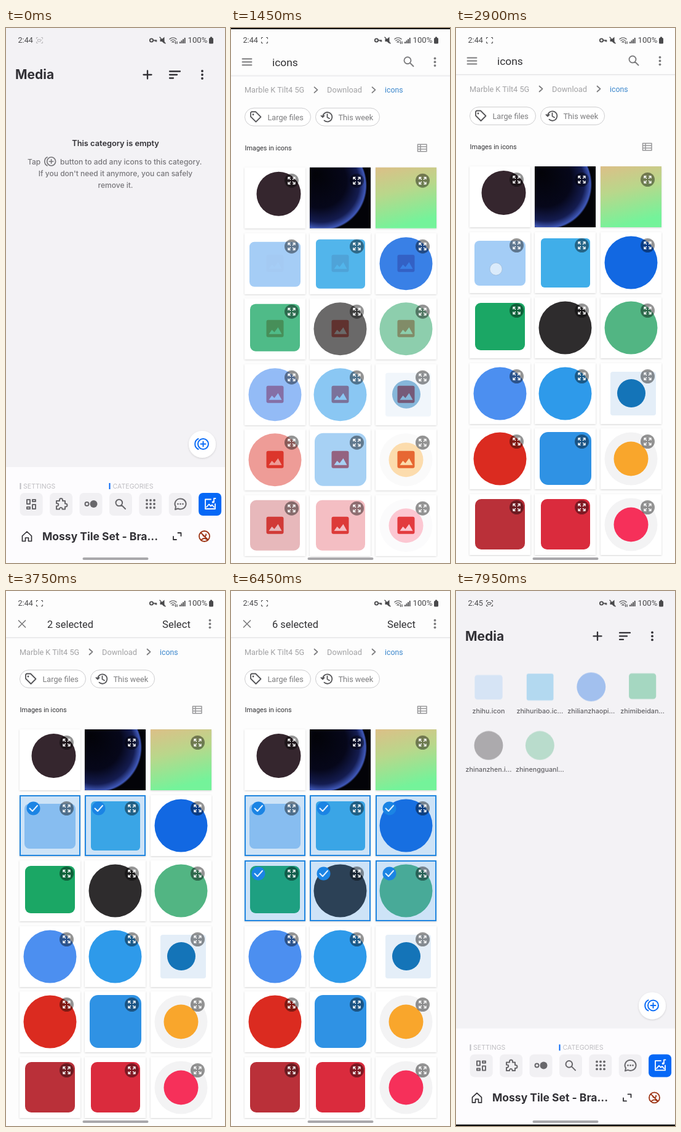
Write an HTML page that moves like this. It is 356 px wide and 870 px high and loops after 8 s.

```html
<!DOCTYPE html>
<html lang="en">
<head>
<meta charset="utf-8">
<title>Adding icons to a category</title>
<style>
html, body { margin: 0; width: 100%; height: 100%; overflow: hidden; background: #000; }
svg { display: block; width: 100vw; height: 100vh; }
.home text { font-family: Inter, sans-serif; }
.picker text, .status text { font-family: Roboto, sans-serif; }
.line { fill: none; stroke-linecap: round; stroke-linejoin: round; }
</style>
</head>
<body>
<svg id="stage" viewBox="0 0 356 870" xmlns="http://www.w3.org/2000/svg"></svg>
<script>
const LOOP = 8000;
const OPEN = 1000, CLOSE = 7600, SLIDE = 620;
const PICKS = [3100, 3500, 4000, 4500, 4900, 5350];
const FIRST_PICK = 3; // tile index of the first selected file

const text = (x, y, s, size, fill, more = '') =>
  `<text x="${x}" y="${y}" font-size="${size}" fill="${fill}" ${more}>${s}</text>`;
const rect = (x, y, w, h, fill, r = 0, more = '') =>
  `<rect x="${x}" y="${y}" width="${w}" height="${h}" rx="${r}" fill="${fill}" ${more}/>`;
const disc = (x, y, r, fill, more = '') => `<circle cx="${x}" cy="${y}" r="${r}" fill="${fill}" ${more}/>`;
const line = (d, stroke, w = 2, more = '') =>
  `<path class="line" d="${d}" stroke="${stroke}" stroke-width="${w}" ${more}/>`;
const group = (id, body, more = '') => `<g id="${id}" ${more}>${body}</g>`;
const dots = (x, y, gap, fill) => [-1, 0, 1].map(k => disc(x, y + k * gap, 1.9, fill)).join('');

const round = fill => disc(49.5, 49.5, 43, fill);
const plate = fill => round('#f3f3f4') + disc(49.5, 49.5, 28, fill);
const ARTS = [
  disc(55.5, 43, 36, '#35262e'),
  rect(0, 0, 99, 99, 'url(#night)'),
  rect(0, 0, 99, 99, 'url(#dawn)'),
  rect(8, 14, 83, 73, '#a4cdf6', 8),
  rect(10, 10, 80, 80, '#40aee9', 6),
  round('#1268e2'),
  rect(9, 9, 81, 77, '#1ba765', 9),
  round('#2e2c2d'),
  round('#52b583'),
  round('#4c8ff0'),
  round('#2e9aea'),
  rect(16, 14, 74, 71, '#e4eef8', 4) + disc(50, 49, 23, '#1474b8'),
  round('#db2b20'),
  rect(8, 6, 84, 86, '#2f92e4', 14),
  plate('#f9a62c'),
  rect(9, 8, 81, 82, '#ba3039', 10),
  rect(10, 8, 80, 82, '#da2b3d', 10),
  plate('#f6305a')
];
const tileX = i => Math.round(22 + (i % 3) * 106.4);
const tileY = i => Math.round(225 + Math.floor(i / 3) * 106.6);

const defs = `<defs>
  <radialGradient id="night" cx=".2" cy=".3" fx=".1" fy=".1" r=".74">
    <stop offset="0" stop-color="#030308"/><stop offset=".6" stop-color="#06071a"/>
    <stop offset=".85" stop-color="#141c50"/><stop offset=".97" stop-color="#3f58b8"/>
    <stop offset="1" stop-color="#030308"/>
  </radialGradient>
  <linearGradient id="dawn" x2=".25" y2="1">
    <stop offset="0" stop-color="#dcbf87"/><stop offset=".45" stop-color="#b9d78b"/>
    <stop offset="1" stop-color="#74f39a"/>
  </linearGradient>
  <filter id="soft" x="-30%" y="-30%" width="160%" height="170%">
    <feDropShadow dx="0" dy="1" stdDeviation="1.5" flood-opacity=".16"/>
  </filter>
  <path id="arrow" class="line" d="M2 2L5.5 5.5M5.5 2.4V5.5H2.4" stroke="#fff" stroke-width="1.4"/>
  <g id="expand">${disc(0, 0, 11.5, '#000', 'opacity=".42"')}
    <use href="#arrow"/><use href="#arrow" transform="scale(-1 1)"/>
    <use href="#arrow" transform="scale(1 -1)"/><use href="#arrow" transform="scale(-1)"/></g>
  <g id="blank">${rect(-14, -14, 28, 28, '#dd4036', 3)}
    <path d="M-10 9L-5 2L-1 6L5 -2L11 9Z" fill="#fff"/></g>
  <g id="addIcon" class="line" stroke-width="2">
    <circle cx="2" r="8.5"/><path d="M2 -4V4M-2 0H6M-6 -8.5A9.5 9.5 0 0 0 -6 8.5"/></g>
</defs>`;

function statusBar() {
  const ink = '#4a4a4c';
  return text(19.5, 24.3, '2:44', 12.6, ink, 'id="clock"')
    + group('recorder', line('M49.5 17.5v-2h2M57.5 15.5h2v2M59.5 22.5v2h-2M51.5 24.5h-2v-2', ink, 1)
      + group('lens', line('M52 18.5h4v3.5h-4zM57 20.3l1.3 -1', ink, 1)))
    + line('M239.5 20h5v2M242.5 20v1.6', ink, 1.6) + disc(236.5, 20, 2.7, 'none', `stroke="${ink}" stroke-width="1.8"`)
    + `<path d="M250.5 18h3l4 -3.5v11l-4 -3.5h-3z" fill="${ink}"/>` + line('M250 15L259 25', ink, 1.4)
    + line('M266 18q5.5 -4.5 11 0M268 20.5q3.5 -3 7 0M270 23q1.5 -1.5 3 0M275.5 22v3.5M278 25.5V22', ink, 1.2)
    + [0, 1, 2, 3].map(k => rect(282 + k * 2.6, 22.5 - k * 2.2, 1.8, 2.5 + k * 2.2, ink)).join('')
    + text(295.5, 24.3, '100%', 13.2, ink)
    + rect(330, 16, 7, 9.5, ink, 1.5) + rect(332, 14.5, 3, 2, ink);
}

function navButtons() {
  const ink = '#68676b';
  const backs = [0, 1, 2, 3, 4, 5, 6].map(k =>
    rect(22.7 + k * 48.4, 756, 37, 37, k === 6 ? '#0668f6' : '#f1f0f3', 7)).join('');
  const grid = [...Array(9).keys()].map(k =>
    disc(229 + (k % 3) * 6, 768 + Math.floor(k / 3) * 6, 1.9, ink)).join('');
  return backs
    + line('M34 767h5v7h-5zM43 767h5v3h-5zM43 775h5v7h-5zM34 779h5v3h-5z', ink)
    + line('M82 769h5v-1.5a2.5 2.5 0 0 1 5 0v1.5h4v4.5h1a2.5 2.5 0 0 1 0 5h-1v4h-4.5v-1a2.3 2.3 0 0 0 -4.5 0v1h-5v-5h1a2.2 2.2 0 0 0 0 -4.5h-1z', ink)
    + disc(131.5, 774, 3, 'none', `stroke="${ink}" stroke-width="2"`) + disc(142.5, 774, 6, ink)
    + line('M188 776L194 782M178.5 772a5.3 5.3 0 1 0 10.6 0a5.3 5.3 0 1 0 -10.6 0', ink)
    + grid
    + line('M275 783l1 -4.5a9 8.5 0 1 1 3.5 3z', ink)
    + [279.5, 283.5, 287.5].map(x => disc(x, 774, 1.3, ink)).join('')
    + line('M333 766.5h-9v15.5h16v-8M326 779l4 -4.5l3 3l2 -2l3 3.5M338 771v-6h2.5', '#fff', 1.8)
    + disc(336.5, 771, 1.8, '#fff');
}

function addedIcons() {
  const names = ['zhihu.icon', 'zhihuribao.ic...', 'zhilianzhaopi...', 'zhimibeidan...', 'zhinanzhen.i...', 'zhinengguanl...'];
  const at = k => [53 + (k % 4) * 83.4, 158.5 + Math.floor(k / 4) * 95.3];
  const arts = names.map((_, k) => {
    const [x, y] = at(k);
    return `<g transform="translate(${x - 27} ${y - 27}) scale(.545)">${ARTS[FIRST_PICK + k]}</g>`;
  }).join('');
  const labels = names.map((s, k) => {
    const [x, y] = at(k);
    return text(x, y + 43, s, 10.7, '#626165', 'text-anchor="middle" font-weight="500"');
  }).join('');
  return group('added', labels + group('addedArts', arts));
}

function home() {
  const ink = '#323136', grey = '#77767a';
  const small = 'font-weight="500"', mid = small + ' text-anchor="middle"';
  const empty = text(178, 192.4, 'This category is empty', 12.8, ink, 'text-anchor="middle" font-weight="600"')
    + text(35, 222.3, 'Tap', 12, grey, small)
    + `<use href="#addIcon" transform="translate(72 217) scale(.82)" fill="none" stroke="${grey}"/>`
    + text(88, 222.3, 'button to add any icons to this category.', 12, grey, small)
    + text(178, 241.3, "If you don't need it anymore, you can safely", 12, grey, mid)
    + text(178, 260.3, 'remove it.', 12, grey, mid);
  return rect(0, 0, 356, 870, '#f3f2f5') + rect(0, 714, 356, 156, '#fdfcfe')
    + text(15, 83.3, 'Media', 21, ink, 'font-weight="700"')
    + line('M223.5 76h13M230 69.5v13', ink, 2.3, 'stroke-linecap="square"')
    + line('M266 70.5h17M266 76h12M266 81.5h6', ink, 2.3) + dots(319, 76, 6, ink)
    + group('empty', empty) + addedIcons()
    + disc(319, 677, 22, '#fff', 'filter="url(#soft)"') + disc(319, 677, 22, '#0668f6', 'id="fabRipple"')
    + '<use href="#addIcon" transform="translate(318.5 676.5)" fill="none" stroke="#0b6cf6"/>'
    + rect(22.5, 740, 2, 10, '#bebdc1') + text(28, 748.7, 'SETTINGS', 10.6, '#bebdc1')
    + rect(167.5, 740, 2, 10, '#0668f6') + text(173.5, 748.7, 'CATEGORIES', 10.6, '#bebdc1')
    + navButtons()
    + line('M26.5 826l7.5 -7l7.5 7v8.5h-5v-5.5h-5v5.5h-5z', ink, 1.7)
    + text(59, 832.8, 'Mossy Tile Set - Bra...', 17.5, ink, 'font-weight="700"')
    + line('M279.5 821h5v5M277 832h-5v-5', ink, 1.8)
    + line('M314 826.5a8.5 8.5 0 1 0 17 0a8.5 8.5 0 1 0 -17 0M316.5 820.5l12 12M318 832q4.5 -4 9 0M320 824a2.6 2.6 0 1 0 5 -1', '#9c3212', 1.8);
}

function tile(i) {
  const picked = i >= FIRST_PICK && i < FIRST_PICK + PICKS.length;
  const mark = picked ? group('pick' + i,
    rect(1, 1, 97, 97, '#2a86dc', 0, 'fill-opacity=".23" stroke="#2186e0" stroke-width="2"')
    + disc(22.5, 21.5, 11, '#1b84e4') + line('M16.5 21.5l4.5 4.5l8 -9', '#e4f1ff', 2)) : '';
  return `<g transform="translate(${tileX(i)} ${tileY(i)})">`
    + rect(0, 0, 99, 99, '#fff', 0, 'filter="url(#soft)"')
    + `<use id="blank${i}" href="#blank" x="49.5" y="49"/>`
    + group('art' + i, ARTS[i]) + mark
    + '<use href="#expand" x="76.5" y="21.5"/></g>';
}

function picker() {
  const ink = '#303033', grey = '#7c7c7e', pale = '#a2a2a4';
  const chip = (x, w, s, icon) =>
    rect(x, 128.5, w, 29, '#fff', 14.5, 'stroke="#cdcdcf"') + icon + text(x + 37, 148, s, 12.7, grey);
  return rect(0, 0, 356, 910, '#fdfdfd')
    + rect(0, 75, 356, 1, '#e4e4e6') + rect(0, 76, 356, 1.5, '#f3f3f5')
    + group('browseBar', line('M18.5 48.5h15M18.5 53.5h15M18.5 58.5h15', grey, 1.8)
      + text(67, 60, 'icons', 17.4, ink)
      + line('M281.5 51a5.5 5.5 0 1 0 11 0a5.5 5.5 0 1 0 -11 0M291 55l5.5 5.5', grey, 1.9))
    + group('selectBar', line('M20.5 48l11 11M31.5 48l-11 11', grey, 1.7)
      + text(67, 59.7, '', 16.4, ink, 'id="count"')
      + disc(277, 54, 30, '#000', 'id="selectRipple"') + text(254, 59.7, 'Select', 16.7, ink))
    + dots(331.5, 53.5, 5.8, grey)
    + text(22, 103.5, 'Marble K Tilt4 5G', 12.7, pale) + text(156, 103.5, 'Download', 12.8, pale)
    + text(250, 103.5, 'icons', 12.3, '#3a86cc')
    + line('M135.5 94.5l5 4.5l-5 4.5M229.5 94.5l5 4.5l-5 4.5', grey, 1.7)
    + chip(22.5, 107, 'Large files', line('M32 136v6.5l8.5 8.5l8 -8l-8.5 -8.5h-6.5z', '#555558', 1.8) + disc(36, 139, 1.4, '#555558'))
    + chip(137.5, 104, 'This week', line('M149 143a7.7 7.7 0 1 1 2.5 5.7M146.5 141l2.5 2.5l2.5 -2.5M156.5 138.5v5l3.5 2', '#555558', 1.8))
    + text(22.5, 197.3, 'Images in icons', 10.9, ink)
    + line('M303.5 187.5h14.5v11.5h-14.5zM308 187.5v11.5M303.5 191.3h14.5M303.5 195.2h14.5', '#98989a', 1.5)
    + ARTS.map((_, i) => tile(i)).join('')
    + rect(0, 859, 356, 50, '#fdfdfd');
}

document.getElementById('stage').innerHTML = defs
  + rect(0, 0, 356, 870, '#000')
  + group('home', home(), 'class="home"')
  + group('picker', picker(), 'class="picker"')
  + group('status', statusBar(), 'class="status"')
  + rect(0, 0, 356, 0, '#000', 0, 'id="curtain"')
  + rect(124.5, 861, 107, 4, '#a9a8ab', 2)
  + disc(0, 0, 10, '#fff', 'id="touch" fill-opacity=".6" stroke="#000" stroke-opacity=".1"');

const el = id => document.getElementById(id);
const set = (id, name, value) => el(id).setAttribute(name, value);
const fade = (id, a) => set(id, 'opacity', a);
const ramp = (t, from, span) => Math.min(1, Math.max(0, (t - from) / span));

// cubic-bezier(.4, 0, .2, 1)
function ease(x) {
  let lo = 0, hi = 1;
  for (let k = 0; k < 20; k++) {
    const s = (lo + hi) / 2, r = 1 - s;
    if (1.2 * r * r * s + 0.6 * r * s * s + s ** 3 < x) lo = s; else hi = s;
  }
  return lo * lo * (3 - 2 * lo);
}

// x, y, press, release
const TOUCHES = [
  [319, 678, 600, 750],
  ...PICKS.map((at, k) => [
    tileX(FIRST_PICK + k) + 43, tileY(FIRST_PICK + k) + 60, k ? at - 90 : 2600, k ? at : 3200
  ]),
  [278, 55, 6800, 6920]
];

function pulse(id, t, at, peak) {
  fade(id, peak * ramp(t, at, 150) * (1 - ramp(t, at + 150, 250)));
}

function draw(t) {
  const opened = ease(ramp(t, OPEN, SLIDE)), closed = ease(ramp(t, CLOSE, SLIDE));
  const returning = t >= CLOSE;
  const drop = 35 * (1 - opened + closed);

  set('home', 'transform', `translate(0 ${returning ? -17 * (1 - closed) : -17 * opened})`);
  set('home', 'visibility', t < OPEN + 100 || returning ? 'visible' : 'hidden');
  set('picker', 'transform', `translate(0 ${drop})`);
  fade('picker', ramp(t, OPEN + 50, 50) * (1 - ramp(t, CLOSE + 50, 80)));
  set('curtain', 'height', t >= OPEN + 100 && !returning ? drop : 0);

  const landed = t >= 7800;
  fade('empty', landed ? 0 : 1);
  fade('added', landed ? 1 : 0);
  fade('addedArts', ramp(t, 7850, 280));
  pulse('fabRipple', t, 600, .16);
  pulse('selectRipple', t, 6800, .08);

  ARTS.forEach((_, i) => {
    const loaded = ramp(t, 1150 + 60 * Math.sqrt(i), 200);
    fade('art' + i, loaded);
    fade('blank' + i, loaded < 1 ? 1 : 0);
  });

  PICKS.forEach((at, k) => fade('pick' + (FIRST_PICK + k), ramp(t, at, 120)));
  const count = PICKS.filter(at => t >= at).length;
  const bar = ramp(t, PICKS[0], 120);
  el('count').textContent = count + ' selected';
  fade('browseBar', 1 - bar);
  fade('selectBar', bar);

  el('clock').textContent = t < 3950 ? '2:44' : '2:45';
  const beat = t % 2000;
  fade('lens', beat >= 1900 || beat < 400 ? 1 : 0);
  fade('recorder', t < 50 ? .35 : 1);

  const touch = TOUCHES.find(([, , down, up]) => t >= down && t < up);
  fade('touch', touch ? 1 : 0);
  if (touch) set('touch', 'transform', `translate(${touch[0]} ${touch[1]})`);
}

const start = performance.now();
function tick() {
  draw((performance.now() - start) % LOOP);
  requestAnimationFrame(tick);
}
tick();
</script>
</body>
</html>
```
